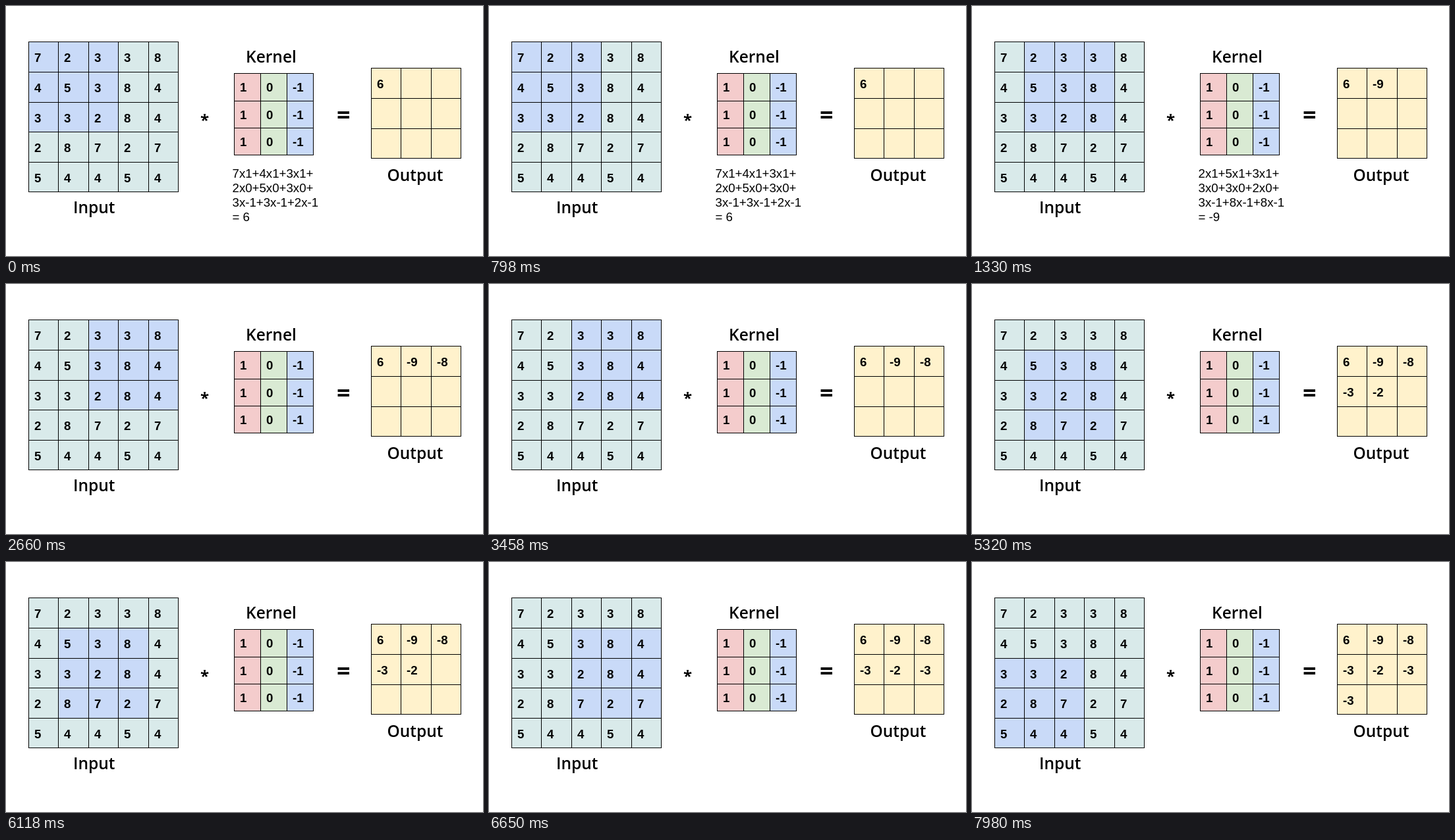
An HTML page for the animation above (8 s loop, 724x380 px).

```html
<!DOCTYPE html>
<html lang="en">
<head>
<meta charset="utf-8">
<title>Convolution</title>
<style>
  html, body { margin: 0; width: 100%; height: 100%; overflow: hidden; background: #fff; }
  svg { display: block; width: 724px; height: 380px; }
  text { white-space: pre; }
  .num { font: bold 18.67px "Liberation Sans", Arial, sans-serif; }
  .sum { font: 18.67px "Liberation Sans", Arial, sans-serif; }
  .label { font: 600 24.5px "Open Sans", sans-serif; }
  .star { font: bold 24px "Open Sans", sans-serif; }
  .equals { font: bold 36px "Open Sans", sans-serif; }
  path { stroke: #000; fill: none; }
</style>
</head>
<body>
<svg id="stage" viewBox="0 0 724 380"></svg>
<script>
const STEP = 1330, LOOP = 8000;
const BLUE = '#c9daf8', TEAL = '#d9eaea', CREAM = '#fff2cc';
const KERNEL_FILLS = ['#f4cccc', '#d9ead3', BLUE];
const input = ['72338', '45384', '33284', '28727', '54454'].map(r => [...r].map(Number));
const kernel = [1, 0, -1];
const stage = document.getElementById('stage');

function add(tag, attrs, content = '') {
  const el = document.createElementNS('http://www.w3.org/2000/svg', tag);
  for (const k in attrs) el.setAttribute(k, attrs[k]);
  el.textContent = content;
  return stage.appendChild(el);
}

const write = (x, y, cls, content) => add('text', { x, y, class: cls }, content);

// xs and ys hold the pixel positions of the grid lines
function grid(xs, ys, dx, dy, fill, value) {
  const cells = [];
  const n = xs.length - 1, right = xs[n], bottom = ys[n];
  for (let r = 0; r < n; r++) for (let c = 0; c < n; c++) {
    const rect = add('rect', {
      x: xs[c] + .5, y: ys[r] + .5,
      width: xs[c + 1] - xs[c], height: ys[r + 1] - ys[r], fill: fill(c)
    });
    const text = write(xs[c] + dx, ys[r] + dy, 'num', value(r, c));
    cells.push({ r, c, rect, text });
  }
  const d = xs.map(x => `M${x + .5} ${ys[0]}V${bottom + 1}`).join('') +
            ys.map(y => `M${xs[0]} ${y + .5}H${right + 1}`).join('');
  const lines = add('path', { d });
  cells.forEach(cell => stage.append(cell.text));
  return cells;
}

const inputCells = grid([34, 79, 125, 170, 216, 261], [54, 100, 146, 191, 237, 282],
  9, 30.5, () => TEAL, (r, c) => input[r][c]);
grid([346, 386, 426, 466], [102, 144, 185, 226],
  9, 28, c => KERNEL_FILLS[c], (r, c) => kernel[c]);
const outputCells = grid([554, 599, 645, 690], [94, 140, 186, 231],
  9, 30.5, () => CREAM, convolve);

write(102, 315, 'label', 'Input');
write(364, 86, 'label', 'Kernel');
write(578.5, 266, 'label', 'Output');
write(295, 182, 'star', '*');
write(502, 178, 'equals', '=');
const sums = [0, 1, 2, 3].map(i => write(343.5, 261 + 22 * i, 'sum', ''));

function convolve(row, col) {
  let total = 0;
  for (let r = 0; r < 3; r++)
    for (let c = 0; c < 3; c++) total += input[row + r][col + c] * kernel[c];
  return total;
}

function sumLines(row, col) {
  const lines = kernel.map((k, c) =>
    [0, 1, 2].map(r => `${input[row + r][col + c]}x${k}`).join('+') + (c < 2 ? '+' : ''));
  return [...lines, `= ${convolve(row, col)}`];
}

function show(step) {
  const row = Math.floor(step / 3), col = step % 3;
  for (const { r, c, rect } of inputCells) {
    const inside = r >= row && r < row + 3 && c >= col && c < col + 3;
    rect.setAttribute('fill', inside ? BLUE : TEAL);
  }
  outputCells.forEach(({ text }, i) => text.setAttribute('visibility', i <= step ? 'visible' : 'hidden'));
  const lines = step < 2 ? sumLines(row, col) : [];
  sums.forEach((el, i) => { el.textContent = lines[i] || ''; });
}

let current = 0;
show(0);
const start = performance.now();
function tick(now) {
  const step = Math.floor(Math.max(0, now - start) % LOOP / STEP);
  if (step !== current) show(current = step);
  requestAnimationFrame(tick);
}
requestAnimationFrame(tick);
</script>
</body>
</html>
```
